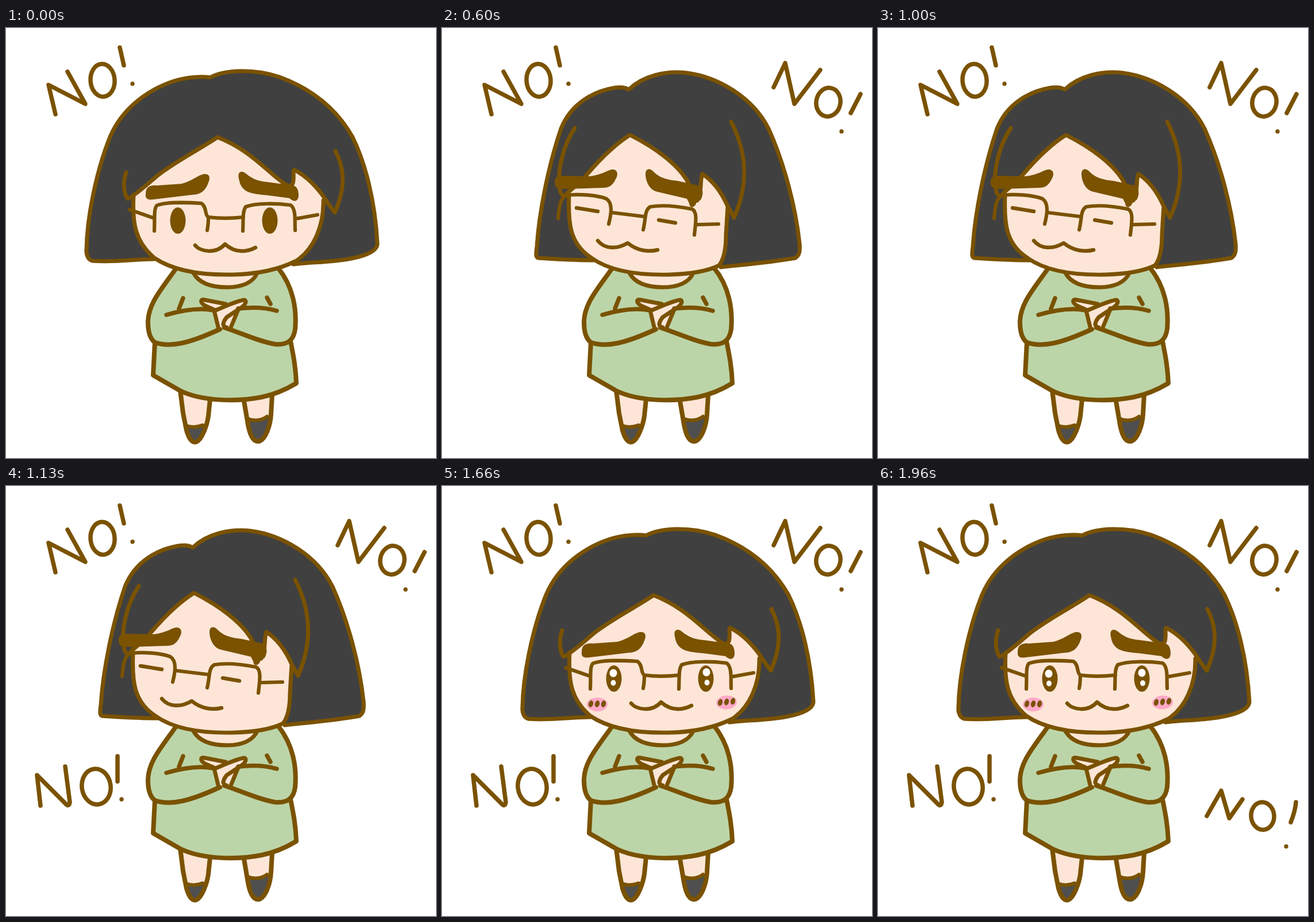
Animation, 748 px wide and 748 px high, one loop 2330 ms. Source, as an HTML page:

```html
<!DOCTYPE html>
<html lang="en">
<head>
<meta charset="utf-8">
<title>No!</title>
<style>
  html, body { margin: 0; width: 100%; height: 100%; overflow: hidden; background: #fff; }
  svg { display: block; width: 100%; height: 100%; }
  path, ellipse { stroke-linecap: round; stroke-linejoin: round; }
</style>
</head>
<body>
<svg id="stage" viewBox="0 0 748 748"></svg>
<script>
const INK = '#7a5200', HAIR = '#404040', SKIN = '#fde6d7', DRESS = '#bcd5a8', SHOE = '#4f4f4f', PINK = '#ffa9c8';
const LOOP = 2330;
const stage = document.getElementById('stage');

function add(parent, tag, attrs = {}) {
  const node = document.createElementNS('http://www.w3.org/2000/svg', tag);
  for (const key in attrs) node.setAttribute(key, attrs[key]);
  return parent.appendChild(node);
}
const group = () => add(stage, 'g');
const line = (g, d, width = 7) => add(g, 'path', { d, fill: 'none', stroke: INK, 'stroke-width': width });
const fill = (g, d, color) => add(g, 'path', { d, fill: color });
const shape = (g, d, color, width = 7) => add(g, 'path', { d, fill: color, stroke: INK, 'stroke-width': width });
const oval = (g, cx, cy, rx, ry, color, turn = 0) =>
  add(g, 'ellipse', { cx, cy, rx, ry, fill: color, transform: `rotate(${turn} ${cx} ${cy})` });

function drawBody() {
  const g = group();
  const leftLeg = 'M303 630L308 670L314 700C319 717 325 722 331 720C341 716 350 690 352 675L355 646';
  const rightLeg = 'M414 649L421 690C425 712 432 720 440 719C452 716 460 690 461 672L463 638';
  fill(g, leftLeg, SKIN);
  fill(g, rightLeg, SKIN);
  fill(g, 'M313 692Q328 698 346 689C342 708 337 718 330 720C322 720 317 712 313 692Z', SHOE);
  fill(g, 'M420 680Q440 685 461 674C458 700 451 717 440 719C430 719 424 706 420 680Z', SHOE);
  line(g, leftLeg, 8);
  line(g, rightLeg, 8);
  line(g, 'M314 692Q327 697 342 691', 6.5);
  line(g, 'M421 680C433 685 446 682 454 676', 6.5);

  // The skirt reaches up behind the folded arms.
  fill(g, 'M259 550L372 515H384L496 550Z', DRESS);
  shape(g, 'M259 546L256 604L303 631C340 649 400 651 445 642C470 637 490 627 505 618C504 590 500 570 495 545', DRESS, 8);
  const leftArm = 'M296 418C270 455 247 480 247 512C247 530 251 541 259 547C285 556 318 549 372 524';
  const rightArm = 'L380 521C412 532 442 546 468 550C488 552 500 545 503 524C506 490 500 450 473 417';
  fill(g, leftArm + rightArm, DRESS);
  line(g, leftArm, 8);
  line(g, rightArm.replace('L', 'M'), 8);

  fill(g, 'M362 491L340 475L382 480L415 473L412 486L403 493L391 522L369 520Z', SKIN);
  line(g, 'M362 490L346 483C337 477 338 471 346 473L382 480', 7);
  line(g, 'M363 492C377 486 400 475 414 473C420 474 416 482 410 486L384 503C377 512 375 519 384 521', 7);
  line(g, 'M362 491L369 520M403 492L391 521', 7);
  line(g, 'M279 499C310 490 340 487 361 491M404 488C430 485 455 487 471 492M308 470L301 488M454 469L460 480', 7.5);
  shape(g, 'M326 426C335 443 355 451 385 451C410 451 430 443 437 426', SKIN, 7);
}

// Shared parts of every head pose, from back to front.
function drawHead(p) {
  const g = group();
  fill(g, p.hair, HAIR);
  line(g, p.hair);
  fill(g, p.face, SKIN);
  line(g, p.edges);
  fill(g, p.brows, INK);
  line(g, p.glasses, 6.2);
  line(g, p.mouth, 6.5);
  if (p.eyes) line(g, p.eyes, 6.5);
  return g;
}

function drawWord([n, ox, oy, rx, ry, turn, bang, dx, dy]) {
  const g = group();
  line(g, n, 7.5);
  add(g, 'ellipse', { cx: ox, cy: oy, rx, ry, fill: 'none', stroke: INK, 'stroke-width': 7.5,
    transform: `rotate(${turn} ${ox} ${oy})` });
  line(g, bang, 7.5);
  oval(g, dx, dy, 3.7, 3.7, INK);
  return g;
}

drawBody();

const front = drawHead({
  hair: 'M258 402C225 402 190 408 150 405C143 403 139 395 140 385C141 330 156 255 178 197C195 150 235 112 290 93C315 85 340 84 355 86C380 73 430 70 475 85C530 105 575 140 603 190C625 235 642 300 646 375C646 388 625 396 605 400C570 408 530 407 500 411',
  face: 'M222 290C219 340 225 372 258 400C295 425 350 430 395 429C440 428 475 420 505 405C535 385 553 345 552 296C537 272 515 252 502 247C498 252 502 272 494 276C470 262 430 212 368 190C330 215 290 235 262 258Z',
  edges: 'M222 290C219 340 225 372 258 400C295 425 350 430 395 429C440 428 475 420 505 405C535 385 553 345 552 300M209 251C202 270 206 291 212 297C226 290 242 275 262 258C290 235 330 215 368 190C420 210 450 245 478 266C490 276 496 277 499 270C502 260 498 245 502 247C530 262 550 288 560 305L572 321C588 285 592 250 573 214',
  brows: 'M243 289C243 277 249 273 262 274L305 271C322 267 332 257 344 254C354 253 356 260 352 269C347 284 337 290 325 290L258 298C247 300 242 297 243 289ZM405 262C402 250 410 247 417 253C430 264 442 267 455 268L500 274C507 276 509 283 509 292C508 303 500 303 493 296L455 291C440 290 425 288 417 283C409 277 407 272 405 262Z',
  glasses: 'M258 353C259 330 257 316 262 309C275 303 310 303 340 305C350 312 345 325 352 329Q352 342 350 352M352 329C375 332 395 331 413 329M412 353C413 335 411 320 417 311C435 304 470 305 495 308C505 315 502 335 503 352M215 316L258 331M503 332L542 325',
  mouth: 'M329 378C338 389 365 394 381 376C400 393 420 389 434 382'
});
oval(front, 299, 335, 13.5, 23, INK);
oval(front, 459, 335, 13.5, 23, INK);

const left = drawHead({
  hair: 'M265 404C230 404 200 402 167 400C162 398 164 390 165 380C169 320 185 240 207 175C225 130 265 110 300 104C312 102 320 104 325 107C350 83 390 74 425 78C480 85 540 120 568 175C595 235 615 310 622 375C623 388 622 395 615 400C570 408 530 411 485 416',
  face: 'M221 285C219 340 222 375 260 400C295 425 350 430 395 429C430 428 460 424 482 413C492 400 494 380 494 360L497 310C488 290 475 270 453 254C448 265 455 290 440 306L430 270C410 235 370 210 327 186C300 203 275 228 252 255Z',
  edges: 'M221 290C219 340 222 375 260 400C295 425 350 430 395 429C430 428 460 424 482 413C492 400 494 380 494 360L497 310M231 174C210 205 198 255 206 285Q211 298 219 286C230 277 242 267 252 255C275 228 300 203 327 186C370 208 413 238 430 272M444 300C453 285 448 265 453 254C475 268 488 290 497 310L508 330C530 280 535 225 503 163',
  brows: 'M196 270C195 260 200 257 210 257L250 258C275 258 285 248 296 246C306 246 307 255 302 263C297 274 290 278 280 278L215 280C200 280 197 278 196 270ZM354 254C354 244 362 243 368 250C378 260 390 264 410 266L447 274C455 278 455 290 450 299L443 303C440 313 431 315 430 305L426 297L375 285C360 282 354 265 354 254Z',
  glasses: 'M202 331C204 310 205 298 216 291C240 288 270 291 286 297C298 305 294 325 290 341M295 321L352 328M350 351C355 330 352 318 362 311C385 307 415 311 435 315C445 320 441 340 439 360M444 342L481 341',
  mouth: 'M271 370C283 385 305 385 323 374C340 388 360 390 375 386',
  eyes: 'M234 313L271 319M377 334L406 339'
});

const right = drawHead({
  hair: 'M341 419C300 415 250 404 210 396C203 380 196 360 196 345C197 290 203 230 215 192C240 145 300 105 355 90C370 87 385 87 395 88C400 77 430 72 455 79C520 92 560 125 585 165C610 205 625 260 628 310C629 340 632 365 631 382C620 392 585 392 560 397C535 402 510 403 495 407',
  face: 'M341 419L333 427C370 431 400 428 435 424C465 417 485 412 500 403C530 385 550 350 552 290L525 268C505 235 475 210 435 192C415 215 397 250 388 280L358 300C350 315 345 330 343 355Z',
  edges: 'M333 427C370 431 400 428 435 424C465 417 485 412 500 403C530 385 550 350 552 295M341 419L342 365C344 335 348 318 356 303M339 291C350 305 362 312 370 318L378 305M388 280C397 250 415 215 435 192C475 210 505 235 525 268M544 270L543 257C558 268 572 282 586 290C590 260 570 220 537 195',
  brows: 'M352 300C348 290 355 287 365 287L400 280C415 277 425 265 437 263C447 262 448 272 444 280C440 295 428 298 418 300L370 309C358 310 353 307 352 300ZM488 258C486 250 494 249 499 255C505 262 515 267 530 268L556 270C566 274 568 288 563 295C550 299 540 294 530 290L505 291C494 288 490 270 488 258Z',
  glasses: 'M361 371C361 345 357 330 368 321C390 316 415 314 435 316C445 322 441 335 446 338L447 359M446 337L500 334M500 356C502 335 497 320 508 309C525 303 545 300 565 304C575 312 571 330 572 347M344 345L360 349',
  mouth: 'M437 387C447 398 465 396 471 383C482 393 495 388 507 384',
  eyes: 'M382 346L424 340M518 334L554 325'
});

const blush = group();
for (const [x, y, tilt] of [[270, 380, 0], [495, 376.5, -4]]) {
  oval(blush, x, y, 18, 12, PINK, tilt);
  for (const i of [-1, 0, 1]) oval(blush, x + i * 11, y - 1 + i * tilt / 4, 4, 6, INK, 15);
}
const shine = [[298, 325.5, 6.5, 7], [298, 342.5, 4.5, 5], [460, 324, 6.5, 7], [461, 342, 4.5, 5]]
  .map(([x, y, rx, ry]) => oval(blush, x, y, rx, ry, '#fff'));

const words = [
  ['M86 150L74 99L138 132L107 76', 168, 91, 21, 28.5, -4, 'M198 34L205 65', 220, 97],
  ['M577 103L597 61L613 132L658 73', 672, 129, 21, 25, 10, 'M728 115L711 148', 695, 180],
  ['M60 556L54 503L105 554Q110 558 111 550L103 488', 157, 523, 25, 31, -8, 'M194 470L194 514', 201, 545],
  ['M572 574L597 530L611 578L634 545', 669, 574, 20, 24, -5, 'M727 550Q726 565 718 585', 710, 627]
].map(drawWord);
const wordStarts = [0, 600, 1130, 1790];

// [start time, head]
const poses = [[0, front], [330, left], [670, right], [1000, left], [1330, right], [1660, front]];
const show = (node, on) => node.setAttribute('visibility', on ? 'visible' : 'hidden');

function render(t) {
  const head = poses.filter(([start]) => t >= start).pop()[1];
  for (const pose of [front, left, right]) show(pose, pose === head);
  words.forEach((word, i) => show(word, t >= wordStarts[i]));
  show(blush, t >= 1660);
  const wobble = t >= 1760 && t < 1960;
  blush.setAttribute('transform', wobble ? 'translate(0 1)' : '');
  const settled = t >= 1960;
  shine.forEach((dot, i) => dot.setAttribute('transform', settled ? `translate(${i % 2 ? -0.5 : -1} 1)` : ''));
}

const begin = performance.now();
function tick() {
  render((performance.now() - begin) % LOOP);
  requestAnimationFrame(tick);
}
tick();
</script>
</body>
</html>
```
